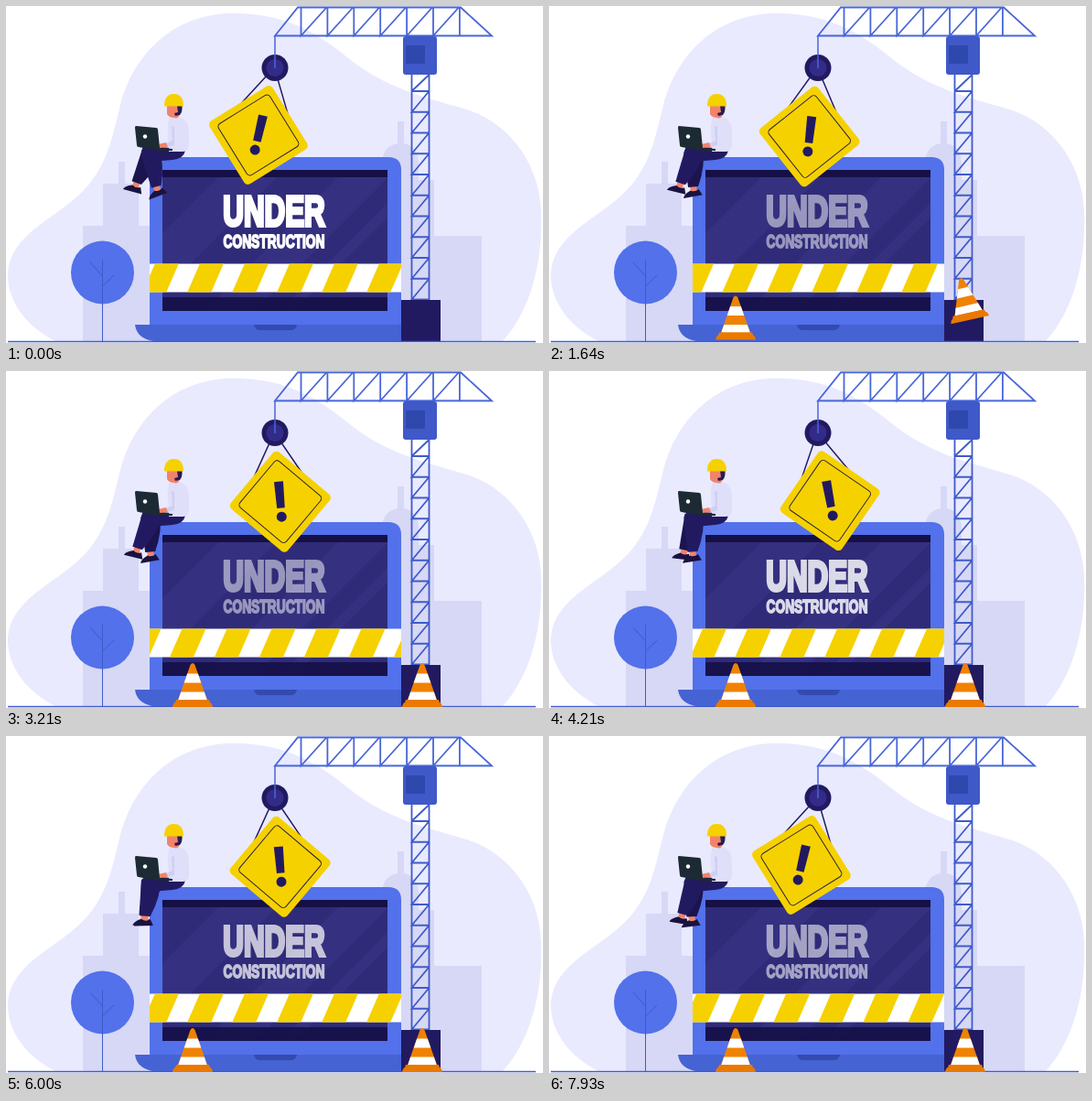
Write an HTML page that moves like this. It is 587x368 px and loops after 8000 ms.

```html
<!DOCTYPE html>
<html lang="en">
<head>
<meta charset="utf-8">
<title>Under construction</title>
<style>
  html, body { margin: 0; width: 100%; height: 100%; overflow: hidden; background: #fff; }
  svg { display: block; width: 100vw; height: 100vh; }
  text { font-family: "Liberation Sans", Arial, sans-serif; font-weight: 700; text-anchor: middle; }
  .line { fill: none; stroke: #3f5bcb; stroke-width: 1.8; }
  .blue { fill: #5271ea; }
  .deep { fill: #3f59c8; }
  .navy { fill: #221a61; }
  .city { fill: #d7d8f5; }
  .gold { fill: #f6d100; }
</style>
</head>
<body>
<svg viewBox="0 0 587 368">
  <defs>
    <clipPath id="screenClip"><path d="M171 179H417V333H171Z"/></clipPath>
    <clipPath id="tapeClip"><path d="M157 281.500H432V312.500H157Z"/></clipPath>
    <g id="cone">
      <path fill="#f08200" d="M-2.500-21Q0-25 2.500-21L17 20H-17Z"/>
      <path fill="#fff" d="M-5.800-11.500H5.800L9.300-1.500H-9.300ZM-12.800 8.500H12.800L15.700 17H-15.700Z"/>
      <path fill="#e97900" d="M-18 17H18L19 20Q21 20 22 25H-22Q-21 20-19 20Z"/>
    </g>
    <g id="shin">
      <path fill="#f2836b" d="M-12 33H-5L-5 41H-12Z"/>
      <path d="M-12-5H9Q9 14-3 35L-14 34Q-13 14-12-5Z"/>
      <path fill="#1a123f" d="M-12 38Q-8 41-3 38L0 45H-21Q-20 41-12 38Z"/>
    </g>
  </defs>

  <path fill="#e9eafe" d="M54 366C22 350 1 322 2 292C4 254 44 236 72 213C109 184 115 148 125 108C140 50 186 8 248 8C308 8 342 31 377 59C415 89 455 99 500 112C552 127 584 175 585 226C587 278 574 332 543 366Z"/>

  <!-- Skyline -->
  <path class="city" d="M84 366V240H106V194H123V170H130V194H145V240H160V366Z"/>
  <path class="city" d="M411 366V171Q412 153 428 150V126H435V150Q450 153 451 171V190H468V251H520V366Z"/>

  <!-- Tree -->
  <circle class="blue" cx="105.500" cy="291" r="34.500"/>
  <path class="line" style="stroke-width:1" d="M105.500 277V366M105.500 295L92 280M105.500 306L118 294"/>

  <!-- Crane -->
  <path class="line" id="tower"/>
  <path class="line" id="jib" style="stroke:#4766d8"/>
  <rect class="deep" x="434" y="33" width="37" height="42" rx="3"/>
  <rect x="437" y="43" width="21" height="20" rx="1" fill="#2f48ad"/>

  <!-- Laptop -->
  <path class="blue" d="M157 348V179Q157 165 171 165H418Q432 165 432 179V348Z"/>
  <g clip-path="url(#screenClip)">
    <path fill="#2f2b78" d="M171 179H417V333H171Z"/>
    <path fill="#353180" d="M240 179H304L171 312V248ZM371 179H417V188L272 333H217ZM417 215V231L315 333H299Z"/>
    <path fill="#161047" d="M171 179H417V187H171Z"/>
    <path fill="#161047" opacity=".9" d="M171 318H417V333H171Z"/>
  </g>
  <path fill="#4563d3" d="M141 348H432V366H161Q143 363 141 348Z"/>
  <path fill="#334bb0" d="M271 348H318Q317 354 311 354H278Q272 354 271 348Z"/>
  <path class="navy" d="M432 321H475V366H432Z"/>
  <path class="line" style="stroke-width:1.300" d="M2 366.500H579"/>

  <g id="message" fill="#fff" stroke="#fff">
    <text transform="translate(293 239.500) scale(.675 1)" font-size="46.500" stroke-width="4">UNDER</text>
    <text transform="translate(293 263.600) scale(.69 1)" font-size="20" stroke-width="1.800">CONSTRUCTION</text>
  </g>

  <g clip-path="url(#tapeClip)">
    <path fill="#fff" d="M157 281H432V313H157Z"/>
    <path class="gold" id="stripes"/>
  </g>

  <!-- Hanging sign -->
  <g id="sign">
    <path fill="none" stroke="#221a61" stroke-width="1.500" d="M-27 48L0 0L27 48"/>
    <g transform="translate(0 76) rotate(45)">
      <rect class="gold" x="-40.500" y="-40.500" width="81" height="81" rx="5"/>
      <rect x="-33" y="-33" width="66" height="66" rx="4" fill="none" stroke="#2b2440" stroke-width="1"/>
    </g>
    <path class="navy" d="M-5 54H5L4.300 83H-4.300Z"/>
    <circle class="navy" cy="92.500" r="5.500"/>
  </g>
  <circle class="navy" cx="294" cy="67.500" r="14.500"/>
  <circle fill="#322c88" cx="294" cy="67.500" r="9.500"/>
  <path class="line" style="stroke:#4766d8;stroke-width:1.500" d="M294 32.500V68"/>

  <!-- Worker -->
  <use href="#shin" id="backLeg" fill="#1b144f"/>
  <use href="#shin" id="frontLeg" fill="#221a61"/>
  <path class="navy" d="M196 158Q194 167 182 168L159 170Q147 168 148 158Q150 153 158 153L180 155Z"/>
  <path fill="#dfdffa" d="M179 122Q186 119 194 123Q200 127 200 137V153Q199 159 193 159H178Q179 150 177 141Q176 128 179 122Z"/>
  <path fill="#f2836b" d="M176 108H190V118Q188 124 184 122Q178 122 176 118Z"/>
  <path fill="#2a1c50" d="M187 109H192.500Q193 116 190 119L185 120L184 117L188 116Z"/>
  <path class="gold" d="M173 109.500Q173 96 183.500 96Q194 96 194 109.500Z"/>
  <path fill="#cfcff2" d="M181 131L182 147L175 150L177 154L184 152V132Z"/>
  <path fill="#f2836b" d="M166 151L175 149L177 154L168 155Z"/>
  <path fill="#1c2a33" d="M142 131L164 133Q166 133 166 135L168 155L182 156V158H166L145 154Q143 154 143 152L141 133Q141 131 142 131Z"/>
  <circle cx="152" cy="142.500" r="2.200" fill="#fff"/>

  <use href="#cone" id="leftCone"/>
  <use href="#cone" id="rightCone"/>
</svg>

<script>
const LOOP = 8000;
const $ = id => document.getElementById(id);
const place = (id, x, y, angle, scale = 1) =>
  $(id).setAttribute('transform', `translate(${x} ${y}) rotate(${angle}) scale(${scale})`);

// Smooth curve through [time, value] points, held outside the range.
function curve(points, t) {
  const last = points.length - 1;
  if (t <= points[0][0]) return points[0][1];
  if (t >= points[last][0]) return points[last][1];
  const i = points.findIndex(p => p[0] > t) - 1;
  const slope = k => {
    const a = points[Math.max(k - 1, 0)], b = points[Math.min(k + 1, last)];
    return (b[1] - a[1]) / (b[0] - a[0]);
  };
  const [t0, v0] = points[i], [t1, v1] = points[i + 1];
  const d = t1 - t0, u = (t - t0) / d, w = 1 - u;
  return v0 * w * w * (1 + 2 * u) + v1 * u * u * (3 - 2 * u)
    + d * u * w * (slope(i) * w - slope(i + 1) * u);
}

const SWING = [[0, 13.2], [930, 12], [2290, 1], [4210, -10.5], [4750, -11.3],
  [6000, -4.8], [6930, 10.5], [7930, 13.2]];
// Shared rhythm of the legs and the fading message.
const PULSE = [[0, .95], [930, 0], [2350, -1], [3500, -.4], [4210, .4],
  [4950, 1], [6000, .05], [7100, -1], [8000, -.4]];
const LIFT = [[450, 0], [930, 34], [1390, 34], [1660, 0]];
const TILT = [[450, 0], [930, -17], [1390, -3], [1660, 0]];
const GROW = [[450, 0], [750, 1]];

let tower = 'M443.5 75V321M462.5 75V321M443.5 93L462.5 75M443.5 93H462.5';
for (let i = 0; i < 10; i++) {
  const y = 93 + i * 22.75;
  tower += `M462.5 ${y}L443.5 ${y + 22.75}H462.5`;
}
$('tower').setAttribute('d', tower);

let jib = 'M294 32.5L319 1.5H497L531 32.5Z';
for (let i = 0; i < 7; i++) {
  const x = 322.5 + i * 28.9;
  jib += `M${x} 1.5V32.5` + (i < 6 ? `L${x + 27.5} 2` : '');
}
$('jib').setAttribute('d', jib);

let stripes = '';
for (let x = 65; x < 450; x += 49) stripes += `M${x} 281h26l-14 32h-26Z`;
$('stripes').setAttribute('d', stripes);

function drawCone(id, x, t) {
  place(id, x, 342 - curve(LIFT, t), curve(TILT, t), curve(GROW, t));
}

function draw(now) {
  const t = now % LOOP;
  const pulse = curve(PULSE, t);
  place('sign', 293.3, 67, curve(SWING, t));
  place('frontLeg', 160, 162, -22 * pulse);
  place('backLeg', 160, 162, 16 * pulse);
  $('message').setAttribute('opacity', Math.min(1, .7 + .31 * pulse));
  $('stripes').setAttribute('transform', `translate(${t % 2000 / 2000 * 49} 0)`);
  drawCone('leftCone', 204, t);
  drawCone('rightCone', 455, t - 900);
}

const start = performance.now();
function tick() {
  draw(performance.now() - start);
  requestAnimationFrame(tick);
}
tick();
</script>
</body>
</html>
```
